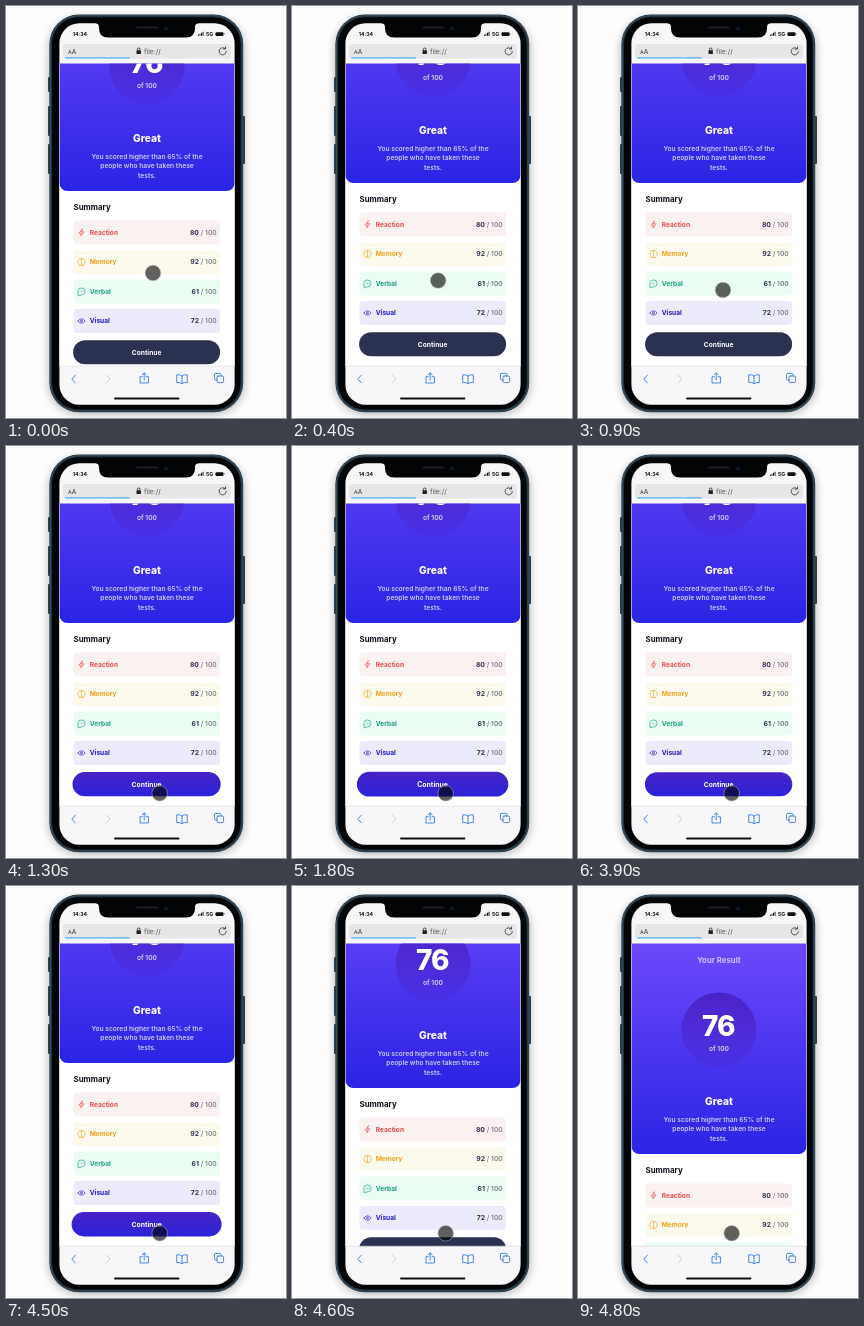
Recreate the animation shown at these times as an HTML page. Size 280x412 px, loop 4.9 s.

```html
<!DOCTYPE html>
<html lang="en">
<head>
<meta charset="utf-8">
<title>Result summary on a phone</title>
<style>
  html, body { margin: 0; width: 100%; height: 100%; overflow: hidden; background: #fdfdfd; }
  svg { display: block; width: 280px; height: 412px; font-family: Inter, "Open Sans", sans-serif; }
  .mid { text-anchor: middle; }
  .bold { font-weight: 700; }
  .line { fill: none; stroke-linecap: round; stroke-linejoin: round; }
  .tool { stroke: #3679e6; stroke-width: .9; }
  .label { font-size: 6.6px; font-weight: 700; }
  .score { font-size: 6.8px; font-weight: 500; fill: #74757f; text-anchor: end; }
  .score tspan { font-weight: 700; fill: #29324f; }
  .blurb { font-size: 6.65px; font-weight: 600; fill: #cbc8ff; }
</style>
</head>
<body>
<svg viewBox="0 0 280 412">
  <defs>
    <linearGradient id="cardFill" x2="0" y2="1">
      <stop stop-color="#6d48fb"/><stop offset="1" stop-color="#2b24e4"/>
    </linearGradient>
    <linearGradient id="discFill" x2="0" y2="1">
      <stop stop-color="#4a22c6"/><stop offset="1" stop-color="#4a22c6" stop-opacity=".2"/>
    </linearGradient>
    <linearGradient id="hoverFill" x2="0" y2="1">
      <stop stop-color="#4822c4"/><stop offset="1" stop-color="#2b22da"/>
    </linearGradient>
    <clipPath id="view"><rect x="53.4" y="57.6" width="175.2" height="302.6"/></clipPath>
    <filter id="soft" x="-20%" y="-20%" width="140%" height="140%"><feGaussianBlur stdDeviation="5"/></filter>
  </defs>

  <rect width="280" height="412" fill="#fdfdfd"/>

  <!-- phone body -->
  <rect x="43" y="12" width="195" height="396" rx="30" fill="#000" opacity=".28" filter="url(#soft)"/>
  <g fill="#2a3f50">
    <rect x="42" y="71" width="3" height="15" rx="1"/>
    <rect x="42" y="100" width="3" height="30" rx="1"/>
    <rect x="42" y="138" width="3" height="30" rx="1"/>
    <rect x="236" y="110" width="3" height="48" rx="1"/>
  </g>
  <rect x="43.4" y="8.6" width="193.8" height="397.6" rx="29.500" fill="#22333f"/>
  <rect x="44.400" y="9.600" width="191.800" height="395.600" rx="28.500" fill="none" stroke="#3d5668" stroke-width=".8"/>
  <rect x="46" y="11.200" width="188.600" height="392.400" rx="27" fill="#030406"/>
  <rect x="53.400" y="17.300" width="175.200" height="381.400" rx="20" fill="#f7f7f9"/>

  <!-- page -->
  <g clip-path="url(#view)">
    <rect x="53" y="57" width="176" height="304" fill="#fff"/>
    <g id="page">
      <path d="M53.400 57H228.600V260a8 8 0 0 1-8 8H61.400a8 8 0 0 1-8-8z" fill="url(#cardFill)"/>
      <circle cx="141" cy="144" r="37.5" fill="url(#discFill)"/>
      <g class="mid">
        <text class="bold" x="141" y="76.700" font-size="7.8" fill="#c9c0ff">Your Result</text>
        <text x="140.2" y="149.500" font-size="28" font-weight="800" letter-spacing="-1" fill="#fff">76</text>
        <text x="141" y="164.700" font-size="6.700" font-weight="600" fill="#d5d0ff">of 100</text>
        <text x="141" y="218.500" font-size="10.200" font-weight="800" fill="#fff">Great</text>
        <text class="blurb" x="141" y="236">You scored higher than 65% of the</text>
        <text class="blurb" x="141" y="245.400">people who have taken these</text>
        <text class="blurb" x="141" y="254.800">tests.</text>
      </g>
      <text class="bold" x="67.5" y="287.200" font-size="7.9" fill="#0c0d18">Summary</text>
      <g id="rows"></g>
      <g id="button">
        <rect id="pill" x="-73.5" y="-12" width="147" height="24" rx="12" fill="#2b3150"/>
        <text class="mid bold" y="2.700" font-size="6.7" fill="#fff">Continue</text>
      </g>
    </g>
  </g>

  <!-- notch and status bar -->
  <path d="M89 17q4 .5 4 4v1.500q0 9 9 9h78q9 0 9-9v-1.500q0-3.500 4-4z" fill="#030406"/>
  <rect x="130" y="20.500" width="22" height="2" rx="1" fill="#1b1d22"/>
  <circle cx="160" cy="22.500" r="2" fill="#11172a"/>
  <text class="bold" x="66.700" y="29.700" font-size="5.200" fill="#111">14:34</text>
  <path d="M192.500 29.800v-1.200M194 29.800v-2M195.500 29.800v-3M197 29.800v-4" stroke="#111" stroke-width="1"/>
  <text class="bold" x="200" y="29.900" font-size="5.300" fill="#111">5G</text>
  <rect x="209.500" y="26.200" width="8" height="3.800" rx="1" fill="#111"/>
  <path d="M218.400 27.300v1.500" stroke="#777" stroke-width=".7"/>

  <!-- address bar -->
  <rect x="57" y="38" width="168" height="14.500" rx="3.500" fill="#e6e6e9"/>
  <rect x="59" y="51.200" width="65" height="1.400" rx=".7" fill="#52b4ee"/>
  <text x="62" y="47.500" font-size="5.300" fill="#333">A<tspan font-size="6.600">A</tspan></text>
  <rect x="130.500" y="44.300" width="4.400" height="3.700" rx=".6" fill="#222"/>
  <path class="line" d="M131.400 44.300v-1a1.300 1.300 0 0 1 2.600 0v1" stroke="#222" stroke-width=".8"/>
  <text x="138" y="47.700" font-size="6.800" fill="#555">file://</text>
  <path class="line" d="M219.300 42.800a3.600 3.600 0 1 0 1 2.500M219.500 40.900v2.100h-2.100" stroke="#333" stroke-width=".8"/>

  <!-- toolbar -->
  <path d="M53.400 360.200H228.600" stroke="#d9d9dd" stroke-width=".6"/>
  <g class="line tool">
    <path d="M69.500 369l-3.700 4 3.700 4"/>
    <path d="M100.300 369l3.700 4-3.700 4" stroke="#c9c9ce"/>
    <path d="M136.300 370.700h-2.300v6.300h8.400v-6.300h-2.300M138.200 374v-7M136.200 368.800l2-2 2 2"/>
    <path d="M176 370q-2-1.700-5.300-1.100v7.700q3.300-.6 5.300 1 2-1.600 5.300-1v-7.700q-3.300-.6-5.300 1.100v7.600"/>
    <rect x="211" y="370" width="6.600" height="6.600" rx="1.300"/>
    <path d="M211 374h-1.200q-1.300 0-1.300-1.300v-4q0-1.300 1.300-1.300h4q1.300 0 1.300 1.300v1.300"/>
  </g>
  <rect x="108" y="391.500" width="65.500" height="2" rx="1" fill="#111"/>

  <circle id="pointer" r="7.800" fill="#000" fill-opacity=".62" stroke="#bbb" stroke-opacity=".65" stroke-width=".8"/>
</svg>

<script>
  const LOOP = 4900, STEP = 100, BOTTOM = 91;
  const HOVER_ON = 1100, HOVER_OFF = 4600, REWOUND = 4800;
  const byId = id => document.getElementById(id);

  const tests = [
    ["Reaction", 80, "#e64b4b", "#fcf1f1", "M.8-3.500-2.600.7H0L-.8 3.500 2.600-.7H0z"],
    ["Memory", 92, "#f0a01c", "#fcfaed", "M0-3.200Q-2.500-4.500-3-1.800-4.700 0-3 1.800-2.500 4.500 0 3.200 2.500 4.500 3 1.800 4.700 0 3-1.800 2.500-4.500 0-3.200V3.200"],
    ["Verbal", 61, "#16a57c", "#ebfcf2", "M-3.600 3.600V0a3.600 3.600 0 1 1 3.600 3.600zM-1.500 0h.01M0 0h.01M1.500 0h.01"],
    ["Visual", 72, "#2419c9", "#ecebfb", "M-3.600 0q3.600-4.600 7.200 0-3.600 4.600-7.200 0M-.9 0a.9.9 0 1 0 1.800 0 .9.9 0 1 0-1.800 0"]
  ];
  byId("rows").innerHTML = tests.map(([name, score, ink, tint, icon], i) => `
    <g transform="translate(0 ${309.5 + 29.5 * i})">
      <rect x="67.5" y="-12" width="146.500" height="24" rx="3.500" fill="${tint}"/>
      <path class="line" d="${icon}" transform="translate(75.5 0)" stroke="${ink}" stroke-width=".65"/>
      <text class="label" x="83.700" y="2.300" fill="${ink}">${name}</text>
      <text class="score" x="210.700" y="2.300"><tspan>${score}</tspan> / 100</text>
    </g>`).join("");

  // Piecewise linear value through [time, value] points.
  function track(points, t) {
    const i = points.findIndex(p => p[0] >= t);
    if (i < 0) return points[points.length - 1][1];
    if (i === 0) return points[0][1];
    const [t0, a] = points[i - 1], [t1, b] = points[i];
    return a + (b - a) * (t - t0) / (t1 - t0);
  }

  const scroll = [[0, 83], [100, 87.5], [200, 90], [300, BOTTOM], [4500, BOTTOM], [4600, 66], [4700, 18], [REWOUND, 0]];
  const pointerX = [[0, 147], [900, 145], [1150, 153.7]];
  const pointerY = [[0, 267], [900, 284], [1150, 347.3]];

  function draw(t) {
    const hover = t >= HOVER_ON && t < HOVER_OFF;
    const scale = hover ? 1 + 0.03 * Math.sin(Math.PI * (t - 1040) / 1500) ** 2 : 1;
    byId("page").setAttribute("transform", `translate(0 ${-track(scroll, t)})`);
    byId("button").setAttribute("transform", `translate(140.600 429.200) scale(${scale})`);
    byId("pill").setAttribute("fill", hover ? "url(#hoverFill)" : "#2b3150");
    byId("pointer").setAttribute("transform", `translate(${track(pointerX, t)} ${track(pointerY, t)})`);
  }

  const start = performance.now();
  function tick() {
    const t = (performance.now() - start) % LOOP;
    draw(Math.floor(t / STEP) * STEP);
    requestAnimationFrame(tick);
  }
  tick();
</script>
</body>
</html>
```
